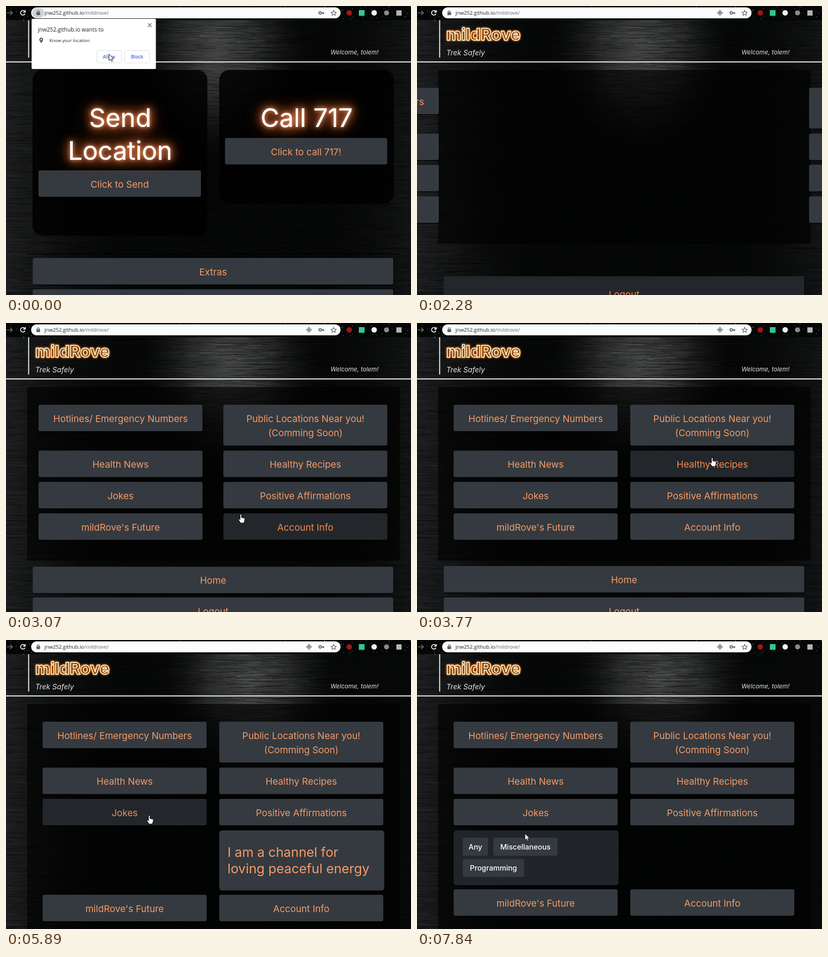
These frames come from a looping animation (885x633 px, 7.99 s). An HTML page with a canvas:

```html
<!DOCTYPE html>
<html lang="en">
<head>
<meta charset="utf-8">
<title>Trek Safely</title>
<style>
html, body { margin: 0; width: 885px; height: 633px; overflow: hidden; background: #050606; }
canvas, svg { position: absolute; left: 0; top: 0; display: block; }
text { font-family: Inter, sans-serif; font-optical-sizing: none; white-space: pre; }
.ui text, text.ui { font-family: "Open Sans", sans-serif; }
.btn { font-size: 20.4px; fill: #f59a66; text-anchor: middle; }
.big { font-size: 56px; fill: #fff; text-anchor: middle; }
.chip { font-size: 16px; font-weight: 500; fill: #fff; text-anchor: middle; }
.quote { font-size: 28.7px; fill: #f59a66; }
.small { font-style: italic; fill: #e4e4e4; }
.logo { font-size: 36px; font-weight: 700; fill: #8a4a14; stroke: #fff1d2; stroke-width: 1.8; }
</style>
</head>
<body>
<canvas id="metal" width="885" height="633"></canvas>
<svg width="885" height="633" viewBox="0 0 885 633">
  <defs>
    <filter id="neon" filterUnits="userSpaceOnUse" x="40" y="130" width="820" height="330" color-interpolation-filters="sRGB">
      <feDropShadow in="SourceGraphic" dx="0" dy="0" stdDeviation="19" flood-color="#a84a18" result="far"/>
      <feDropShadow in="SourceGraphic" dx="0" dy="0" stdDeviation="10" flood-color="#bb5a2a" result="mid"/>
      <feDropShadow in="SourceGraphic" dx="0" dy="0" stdDeviation="4" flood-color="#f0a27c" result="near"/>
      <feMerge>
        <feMergeNode in="far"/><feMergeNode in="far"/><feMergeNode in="mid"/>
        <feMergeNode in="mid"/><feMergeNode in="near"/>
      </feMerge>
    </filter>
    <filter id="sign" filterUnits="userSpaceOnUse" x="40" y="30" width="220" height="65" color-interpolation-filters="sRGB">
      <feDropShadow in="SourceGraphic" dx="0" dy="0" stdDeviation="2.2" flood-color="#ee8420" result="glow"/>
      <feMerge><feMergeNode in="glow"/><feMergeNode in="glow"/></feMerge>
    </filter>
  </defs>

  <g id="page"></g>

  <g id="header">
    <path d="M49.5 31V113" stroke="#dcdcdc" stroke-width="2.4"/>
    <path d="M0 122.5H885" stroke="#dcdcdc" stroke-width="2.6"/>
    <g filter="url(#sign)"><text class="logo" x="64" y="75">mildRove</text></g>
    <text class="small" x="64" y="108" font-size="15.8">Trek Safely</text>
    <text class="small" x="814" y="106" font-size="13.4" text-anchor="end">Welcome, tolem!</text>
  </g>

  <g id="browser" class="ui" fill="none">
    <path d="M2 15H14M9 10l5 5-5 5" stroke="#777" stroke-width="1.6"/>
    <path d="M41 12a5 5 0 1 0 .4 5M42 9v4.5h-4.5" stroke="#fff" stroke-width="1.8"/>
    <rect x="55" y="3" width="676" height="24" rx="12" fill="#fbfcfd"/>
    <rect id="lockHalo" x="57" y="4" width="26" height="22" rx="11" fill="#cfd2d6"/>
    <rect x="66.5" y="13.5" width="8" height="6.5" rx="1" fill="#5f6368"/>
    <path d="M68.3 14v-1.5a2.2 2.2 0 0 1 4.4 0V14" stroke="#5f6368" stroke-width="1.3"/>
    <text x="84" y="19.2" font-size="11.2" fill="#202124">jnw252.github.io<tspan fill="#63676c">/mildrove/</tspan></text>
    <g id="target" stroke="#5f6368" stroke-width="1.3">
      <circle cx="662" cy="15" r="4"/><circle cx="662" cy="15" r="1.6" fill="#5f6368"/>
      <path d="M662 8.5v2.5M662 19v2.5M655.5 15h2.5M666 15h2.5"/>
    </g>
    <circle cx="686.5" cy="15" r="2.7" stroke="#5f6368" stroke-width="2"/>
    <path d="M689 15h6.5M693 15v3" stroke="#5f6368" stroke-width="2.2"/>
    <path d="M716 9.5l1.7 3.8 4 .4-3 2.7.9 4-3.6-2.1-3.6 2.1.9-4-3-2.7 4-.4z" stroke="#5f6368" stroke-width="1.3"/>
    <circle cx="750" cy="15" r="6" fill="#a31515"/>
    <rect x="771" y="9" width="12.5" height="12.5" fill="#2fc98f"/>
    <circle cx="804.5" cy="15" r="6" fill="#f4f4f4"/>
    <circle cx="831.5" cy="15" r="5.5" fill="#8a8a8a"/>
    <rect x="853" y="9.5" width="11.5" height="11.5" fill="#b4b4b4"/>
  </g>

  <g id="dialog" class="ui">
    <rect x="56" y="28" width="271.5" height="110" rx="2" fill="#fff"/>
    <path d="M310 38l8 8M318 38l-8 8" stroke="#5f6368" stroke-width="1.5"/>
    <text x="69.5" y="56" font-size="12" fill="#202124">jnw252.github.io wants to</text>
    <path d="M77 81.5c-3-4-4.3-5.800-4.300-8a4.300 4.300 0 0 1 8.600 0c0 2.200-1.300 4-4.300 8z" fill="#5f6368"/>
    <circle cx="77" cy="73.500" r="1.500" fill="#fff"/>
    <text x="95" y="79" font-size="9.800" fill="#202124">Know your location</text>
    <g fill="none" stroke="#d5d8dc">
      <rect x="198.500" y="97.500" width="54" height="27" rx="3"/>
      <rect x="259.500" y="97.500" width="54" height="27" rx="3"/>
    </g>
    <g font-size="10.300" font-weight="600" fill="#4a62e0" text-anchor="middle">
      <text x="225" y="115">Allow</text><text x="286.500" y="115">Block</text>
    </g>
  </g>

  <g id="cursor" stroke="#000" stroke-linejoin="round">
    <path id="arrow" d="M0 0V14.500L3.400 11.500 5.800 16.500 8 15.500 5.800 10.500H10z" fill="#fff"/>
    <path id="hand" d="M-1.500 1.500a1.500 1.500 0 0 1 3 0V7l6 1.300c1.200.3 1.500 1 1.400 2.200L8 15.500 6.500 19H-.5L-4.500 12.500c-1-1.700 1-2.800 2-1.500l1 1.200z" fill="#fff"/>
  </g>
</svg>

<script>
const LOOP = 7990;
const $ = id => document.getElementById(id);
const show = (id, on) => $(id).setAttribute("opacity", on ? 1 : 0);

const ticks = [...Array.from({ length: 12 }, (_, i) => i * 120),
  1470, 1590, 1740, 1870, 2010, 2130, 2280, 2400, 2520, 2670, 2800, 2950, 3070, 3190, 3340, 3490, 3610,
  3770, 3920, 4040, 4180, 4300, 4420, 4570, 4690, 4970, 5090, 5240, 5360, 5500, 5620, 5740, 5890,
  6940, 7060, 7210, 7330, 7450, 7570, 7690, 7840];

// time, x, y of the pointer tip
const path = [[0, 225, 105], [120, 225, 105], [480, 300, 270], [840, 378, 520], [1200, 394, 590], [1470, 400, 618],
  [1590, 404, 645], [2520, 440, 645], [2670, 470, 592], [2800, 492, 505], [2950, 505, 450], [3070, 513, 419],
  [3190, 560, 385], [3340, 605, 342], [3490, 632, 300], [3610, 652, 250], [3770, 645, 295], [4040, 650, 337],
  [4180, 640, 365], [4300, 618, 400], [4420, 593, 428], [4690, 592, 446], [4970, 600, 422], [5090, 612, 385],
  [5360, 612, 385], [5500, 560, 380], [5620, 432, 374], [5740, 332, 380], [5890, 313, 384], [7060, 313, 384],
  [7210, 318, 378], [7690, 250, 402], [7840, 236, 424]];

function pointerAt(t) {
  const i = path.findIndex(k => k[0] > t);
  if (i < 0) return path.at(-1).slice(1);
  const [a, b] = [path[i - 1], path[i]];
  const p = (t - a[0]) / (b[0] - a[0]);
  return [a[1] + (b[1] - a[1]) * p, a[2] + (b[2] - a[2]) * p];
}

// cubic-bezier(.25, .1, .25, 1)
function ease(p) {
  if (p <= 0 || p >= 1) return p <= 0 ? 0 : 1;
  const curve = (a, b, s) => 3 * a * s * (1 - s) ** 2 + 3 * b * s * s * (1 - s) + s ** 3;
  let lo = 0, hi = 1;
  for (let i = 0; i < 25; i++) {
    const mid = (lo + hi) / 2;
    if (curve(.25, .25, mid) < p) lo = mid; else hi = mid;
  }
  return curve(.1, 1, lo);
}

const ctx = $("metal").getContext("2d");
let painted;

// Brushed metal lit around cx, with streaks from a seeded generator.
function paintMetal(cx, rightLight) {
  const key = cx + "/" + rightLight;
  if (key === painted) return;
  painted = key;
  let seed = 7;
  const rnd = () => (seed = seed * 16807 % 2147483647) / 2147483647;
  const fill = (style, x, y, w, h) => { ctx.fillStyle = style; ctx.fillRect(x, y, w, h); };
  const ramp = (g, stops) => { stops.forEach(([o, v, a]) => g.addColorStop(o, `rgba(${v},${v + 1},${v + 2},${a})`)); return g; };
  const light = (x, y) => Math.exp(-(((x - cx) / 130) ** 2) - ((y - 90) / 110) ** 2)
    + .3 * Math.exp(-x / 80) + .3 * rightLight * Math.exp((x - 885) / 60);

  fill("#060707", 0, 0, 885, 633);
  fill(ramp(ctx.createLinearGradient(0, 0, 260, 0), [[0, 32, .9], [.3, 26, .7], [1, 10, 0]]), 0, 0, 885, 633);
  fill(ramp(ctx.createLinearGradient(885, 0, 700, 0), [[0, 30, .9 * rightLight], [.35, 24, .6 * rightLight], [1, 10, 0]]), 0, 0, 885, 633);
  ctx.save();
  ctx.translate(cx, 90);
  ctx.scale(1, 1.25);
  fill(ramp(ctx.createRadialGradient(0, 0, 0, 0, 0, 200), [[0, 74, .95], [.45, 52, .75], [.75, 28, .4], [1, 8, 0]]), -200, -200, 400, 400);
  ctx.restore();
  for (let i = 0; i < 9000; i++) {
    const x = rnd() * 960 - 70, y = Math.floor(rnd() * 633), len = 8 + rnd() * 70;
    if (i % 3) fill(`rgba(0,0,0,${.1 + .3 * rnd()})`, x, y, len, 1);
    else fill(`rgba(255,255,255,${.16 * rnd() * light(x + len / 2, y)})`, x, y, len, 1);
  }
  fill("#050606", 0, 0, 885, 31);
  for (let i = 0; i < 130; i++) fill(`rgba(235,240,255,${.3 + .6 * rnd()})`, rnd() * 885, rnd() * 31, 1.2, 1.2);
}

let pointer, overButton;
const over = (x, y, w, h) => pointer[0] >= x && pointer[0] <= x + w && pointer[1] >= y && pointer[1] <= y + h;
const rect = (x, y, w, h, r, fill, more = "") =>
  `<rect x="${x}" y="${y}" width="${w}" height="${h}" rx="${r}" fill="${fill}" ${more}/>`;
const text = (cls, x, y, str, more = "") => `<text class="${cls}" x="${x}" y="${y}" ${more}>${str}</text>`;
const rule = y => `<path d="M46 ${y}H860" stroke="#000" stroke-width="1.6"/>`;

function button(x, y, w, lines, h = 58) {
  const hot = over(x, y, w, h);
  overButton ||= hot;
  return rect(x + 1.5, y + 1.5, w, h, 4, "#000") + rect(x, y, w, h, 4, hot ? "#23272b" : "#343a40")
    + lines.split("|").map((s, i) => text("btn", x + w / 2, y + 37.8 + i * 31.3, s, hot ? 'style="fill:#f58a50"' : "")).join("");
}

function homePage(t) {
  const grown = t >= 720, dy = grown ? 80.5 : 0;
  paintMetal(grown ? 530 : 465, grown ? .2 : .6);
  const shade = 'fill-opacity=".84"';
  return rect(58, 140, 382, 363 + dy, 22, "#000", shade) + rect(466, 140, 381.5, 293, 22, "#000", shade)
    + button(71, 360, 355, "Click to Send") + button(478.5, 289, 354.5, "Click to call 717!")
    + `<g filter="url(#neon)">${text("big", 249.5, 265, "Send")}${text("big", 249.5, 336.5, "Location")}${text("big", 657, 265, "Call 717")}</g>`
    + (grown ? text("btn", 249.5, 460, "Latitude: 40.2618374") + text("btn", 249.5, 491.5, "Longitude: -74.3852461") : "")
    + rule(543 + dy) + button(58.5, 552 + dy, 788, "Extras") + button(58.5, 620.5 + dy, 788, "Logout");
}

function affirmation() {
  return rect(466, 417, 360.5, 131.5, 6, "#343a40")
    + rect(482.5, 430.5, 326, 105, 2, "none", 'stroke="#2e3338"')
    + text("quote", 484, 475, "I am a channel for") + text("quote", 484, 510.5, "loving peaceful energy");
}

function jokes() {
  const chip = (x, y, w, label) => rect(x, y, w, 39.5, 4, "#343a40") + text("chip", x + w / 2, y + 25.7, label);
  return rect(80, 417, 360.5, 120, 6, over(80, 417, 360, 120) ? "#212529" : "#343a40")
    + chip(100, 433, 55, "Any") + chip(167, 433, 140, "Miscellaneous") + chip(100, 479.5, 134, "Programming");
}

function extrasPage(t) {
  const panel = t < 5240 ? 0 : t < 6940 ? 1 : 2;
  const left = 1 - ease((t - 2220) / 1050);
  const x1 = 80 - 407 * left, x2 = 466 + 407 * left;
  const row = [417, 558, 546][panel];
  paintMetal(panel ? 532 : 490, panel ? .1 : .6);
  return rect(46, 140, 814.5, panel ? 500 : 378, 0, "#000", 'fill-opacity=".62"')
    + (panel ? "" : rule(519))
    + button(x1, 179, 358.5, "Hotlines/ Emergency Numbers")
    + button(x2, 179, 358.5, "Public Locations Near you!|(Comming Soon)", 89.5)
    + button(x1, 279.5, 358.5, "Health News") + button(x2, 279.5, 358.5, "Healthy Recipes")
    + button(x1, 348, 358.5, "Jokes") + button(x2, 348, 358.5, "Positive Affirmations")
    + ["", affirmation, jokes].map((make, i) => i && i === panel ? make() : "").join("")
    + button(x1, row, 358.5, "mildRove's Future") + button(x2, row, 358.5, "Account Info")
    + (panel ? "" : button(58.5, 532.3 + 62 * left, 788, "Home") + button(58.5, 601, 788, "Logout"));
}

function render(t) {
  pointer = pointerAt(t);
  overButton = false;
  $("page").innerHTML = t < 2280 ? homePage(t) : extrasPage(t);
  $("dialog").setAttribute("opacity", t < 120 ? 1 : t < 240 ? .5 : 0);
  show("lockHalo", t < 960);
  show("target", t >= 960);
  $("cursor").setAttribute("transform", `translate(${pointer})`);
  show("arrow", !overButton);
  show("hand", overButton);
}

const start = performance.now();
let shown = -1;
function frame() {
  const now = (performance.now() - start) % LOOP;
  const t = ticks.findLast(k => k <= now);
  if (t !== shown) render(shown = t);
  requestAnimationFrame(frame);
}
frame();
</script>
</body>
</html>
```
